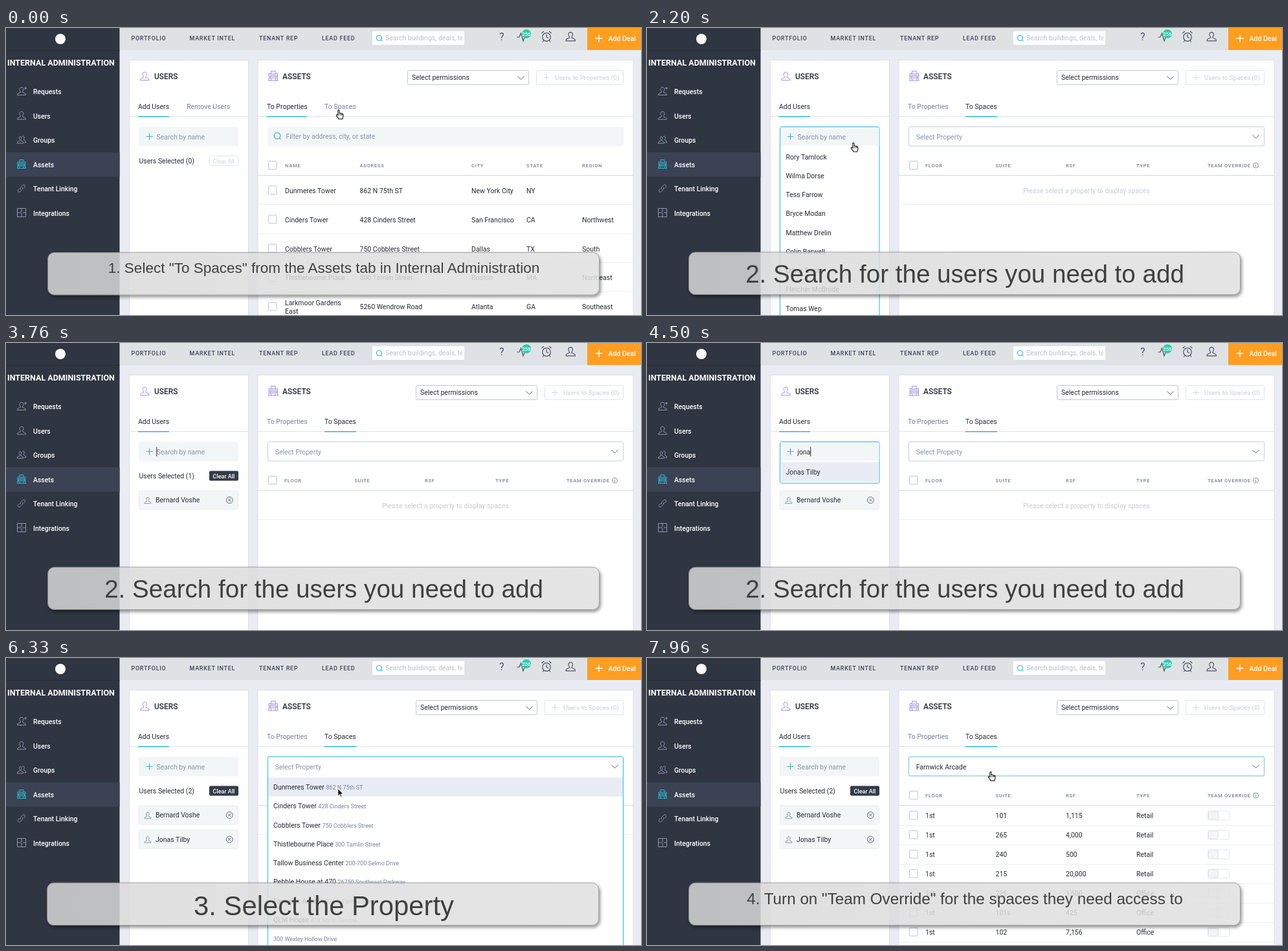
Animation, 981 px wide and 443 px high, one loop 8 s. Source, as an HTML page:

```html
<!DOCTYPE html>
<html lang="en">
<head>
<meta charset="utf-8">
<title>Assign users to spaces</title>
<style>
html, body { margin: 0; width: 100%; height: 100%; overflow: hidden; background: #e9ecf3; }
svg { display: block; width: 981px; height: 443px; font-family: Roboto, Arial, sans-serif; }
text { white-space: pre; }
</style>
</head>
<body>
<svg viewBox="0 0 981 443">
  <defs>
    <linearGradient id="glass"><stop stop-color="#dadada"/><stop offset="1" stop-color="#e1e1e1"/></linearGradient>
    <filter id="shadow" x="-5%" y="-30%" width="110%" height="170%">
      <feDropShadow dx="2" dy="3" stdDeviation="2.5" flood-opacity=".5"/>
    </filter>
    <clipPath id="searchClip"><rect x="566" y="5" width="139" height="21"/></clipPath>
    <clipPath id="listClip"><rect x="405" y="183" width="548" height="260"/></clipPath>
  </defs>
  <g id="base"></g>
  <g id="live"></g>
</svg>
<script>
const INK = '#262b36', MUTED = '#7482a3', HINT = '#8794ae', BLUE = '#2eb8d6', PALE = '#f2f6f6', FAINT = '#c6ccd8';
const LOOP = 8000, ROW = 29.25;

const PERSON = 'M7 1C5 1 4 2.4 4 4.2 4 5.7 4.7 6.8 5.4 7.4V8.8L1.5 10.5C.8 11 .5 12 .5 13H13.5C13.5 12 13.2 11 12.5 10.5L8.6 8.8V7.4C9.3 6.8 10 5.7 10 4.2 10 2.4 9 1 7 1Z';
const BUILDING = 'M1 13.5V4H4M4 13.5V.5H10V13.5M10 4H13V13.5M0 13.5H14M6 3V11M8 3V11M2.5 6V11M11.5 6V11';
const LINK = 'M6 8.5C5 7.5 5 6 6 5L9 2C11 0 14 3 12 5L10 7M8 5.5C9 6.5 9 8 8 9L5 12C3 14 0 11 2 9L4 7';
const GRID = 'M.5.5H13.5V13.5H.5ZM7 .5V5L5.5 6.5 7 8V13.5M.5 7H5M9 7H13.5';
const PAIR = 'M5 2C3 2 3 6 4.3 7V8.4L.5 10.5V12.5H9.5V10.5L6 8.4V7C7.2 6 7 2 5 2ZM8 3C9-.3 12 1.5 11 5L10.3 7.3 13.6 9.5V11.5H11';
const HAND = 'M-1.2 8V1.3C-1.2-.2 1-.2 1 1.3V5.5C1.2 4.6 3 4.6 3 5.8 3.3 5 5 5.2 5 6.4 5.4 5.8 6.8 6 6.8 7.2V10C6.8 11.5 5.8 12 5.8 14H0C0 12.5-2.5 10.5-3.6 8.6-4.2 7.4-2.6 6.6-1.2 8Z';
const ARROW = 'M0 0V11.5L2.6 9 4.4 13 6.2 12.2 4.5 8.4H8Z';

const clamp = v => Math.max(0, Math.min(1, v));
const ramp = (t, from, to) => clamp((t - from) / (to - from));
const smooth = p => p * p * (3 - 2 * p);

// y is the middle of the capital letters
function text(x, y, str, { size = 10.5, fill = INK, weight = 400, gap = 0, more = '' } = {}) {
  return `<text x="${x}" y="${(y + size * .355).toFixed(2)}" font-size="${size}" fill="${fill}" font-weight="${weight}" letter-spacing="${gap}" ${more}>${str}</text>`;
}
const rect = (x, y, w, h, fill = 'none', stroke = 'none', r = 0) =>
  `<rect x="${x}" y="${y}" width="${w}" height="${h}" rx="${r}" fill="${fill}" stroke="${stroke}"/>`;
const path = (d, stroke, width = 1, fill = 'none', at = '') =>
  `<path d="${d}" stroke="${stroke}" stroke-width="${width}" fill="${fill}" ${at && `transform="${at}"`}/>`;
const icon = (d, x, y, color, scale = 1, width = 1) =>
  path(d, color, width / scale, 'none', `translate(${x} ${y}) scale(${scale})`);
const hline = (x1, x2, y, color) => path(`M${x1} ${y}H${x2}`, color);
const plus = (x, y, r, color, width = 1.2) => path(`M${x - r} ${y}H${x + r}M${x} ${y - r}V${y + r}`, color, width);
const chevron = (x, y) => path(`M${x - 5} ${y - 2.5}L${x} ${y + 2.5} ${x + 5} ${y - 2.5}`, '#566078');
const lens = (x, y, r) => `<circle cx="${x}" cy="${y}" r="${r}" fill="none" stroke="${BLUE}" stroke-width="1.2"/>` +
  path(`M${x + r * .7} ${y + r * .7}l2 2`, BLUE, 1.2);
const fade = (alpha, body) => alpha <= 0 ? '' : `<g opacity="${alpha.toFixed(3)}">${body}</g>`;
const heading = (x, y, s) => text(x, y, s, { size: 7.5, weight: 500, gap: .75, fill: '#75809a' });
const checkbox = y => rect(405.5, y - 6.5, 12.5, 12.5, '#fff', '#bcc4d1', 1);
const tab = (x, s, fill = INK) => text(x, 121.5, s, { fill });
const underline = (x, w) => rect(x, 136, w, 1.5, BLUE);

const pen = document.createElement('canvas').getContext('2d');
pen.font = '10.5px Roboto, Arial, sans-serif';

const people = ['Rory Tamlock', 'Wilma Dorse', 'Tess Farrow', 'Bryce Modan', 'Matthew Drelin', 'Colin Barwell',
  'Omar Tranby', 'Fletcher McBrode', 'Tomas Wep'];
const first = 'Bernard Voshe', second = 'Jonas Tilby';

const buildings = [
  ['Dunmeres Tower', '862 N 75th ST', 'New York City', 'NY', ''],
  ['Cinders Tower', '428 Cinders Street', 'San Francisco', 'CA', 'Northwest'],
  ['Cobblers Tower', '750 Cobblers Street', 'Dallas', 'TX', 'South'],
  ['Thistlebourne Place', '300 Tamlin Street', 'Boston', 'MA', 'Northeast'],
  ['Larkmoor Gardens', '5260 Wendrow Road', 'Atlanta', 'GA', 'Southeast']];

const properties = [
  ['Dunmeres Tower', '862 N 75th ST'], ['Cinders Tower', '428 Cinders Street'],
  ['Cobblers Tower', '750 Cobblers Street'], ['Thistlebourne Place', '300 Tamlin Street'],
  ['Tallow Business Center', '200-700 Selmo Drive'], ['Pebble House at 470', '26750 Southeast Parkway'],
  ['Farnwick Arcade', '274 N Farnwick Ave'], ['QLM House', '418 North Tamble'],
  ['', '300 Wexley Hollow Drive'], ['OBN Labs Headquarters', '2040 Q Avenue SE'],
  ['835 North Callowen Street', '835 North Callowen Street'], ['Kilnbank Court IV', '760 Corbel Street'],
  ['Three Pelworth Campus Drive', 'Two Pelworth Campus Drive'], ['Larkmoor Gardens East', '5260 Wendrow Road']];

const spaces = [['101', '1,115', 'Retail'], ['265', '4,000', 'Retail'], ['240', '500', 'Retail'], ['215', '20,000', 'Retail'],
  ['225', '1,500', 'Office'], ['101s', '425', 'Office'], ['102', '7,156', 'Office']];

const captions = [
  { from: 0, x: 64, y: 346, size: 22.5, mid: 370.5, words: '1. Select "To Spaces" from the Assets tab in Internal Administration' },
  { from: 1060, x: 64, y: 345.5, size: 38.6, mid: 379, words: '2. Search for the users you need to add' },
  { from: 4700, x: 63, y: 346.5, size: 41.8, mid: 382, words: '3. Select the Property' },
  { from: 7130, x: 64, y: 346.5, size: 24.25, mid: 371, words: '4. Turn on "Team Override" for the spaces they need access to' }];

function sidebar() {
  const entries = [['Requests', PERSON], ['Users', PERSON], ['Groups', PAIR], ['Assets', BUILDING], ['Tenant Linking', LINK], ['Integrations', GRID]];
  return rect(0, 0, 175.5, 443, '#2f3541') + hline(0, 175.5, 34.5, '#282d38') + rect(0, 192, 175.5, 37.5, '#3b4253') +
    '<circle cx="84" cy="17" r="8" fill="#fff"/>' +
    text(2, 53.5, 'INTERNAL ADMINISTRATION', { size: 12.5, weight: 700, fill: '#fff' }) +
    entries.map(([name, d], i) => {
      const y = 98.5 + i * 37.5;
      return icon(d, 17, y - 8, name === 'Assets' ? BLUE : '#8c97af') + text(42, y, name, { weight: 500, size: 10.4, fill: '#fff' });
    }).join('') + plus(30, 93, 2, '#8c97af', 1);
}

function topBar() {
  const color = '#4a5368';
  return rect(175.5, 0, 805.5, 34, '#dfe2e4') +
    [[193.5, 'PORTFOLIO'], [283.5, 'MARKET INTEL'], [391, 'TENANT REP'], [488, 'LEAD FEED']]
      .map(([x, s]) => text(x, 15.5, s, { size: 9, weight: 500, gap: .7, fill: '#3b4357' })).join('') +
    rect(566, 5, 142, 21, '#fff', 'none', 1) + lens(576.5, 15.5, 4) +
    `<g clip-path="url(#searchClip)">${text(586, 15.5, 'Search buildings, deals, tenants', { fill: '#b9c1ce' })}</g>` +
    text(762, 13, '?', { size: 16, fill: color }) +
    path('M789.5 14H793L795.5 8 799 20 801.5 13H806', color, 1.2) +
    '<circle cx="804" cy="9" r="7" fill="#2acfab"/>' +
    text(804, 9, '256', { size: 7.5, weight: 500, fill: '#fff', more: 'text-anchor="middle"' }) +
    `<circle cx="835" cy="14" r="6.3" fill="none" stroke="${color}" stroke-width="1.2"/>` +
    path('M835 10V14L838 15.5M827.5 8L831 5M842.5 8L839 5M831 19L829 21.5M839 19L841 21.5', color, 1.2) +
    icon(PERSON, 864.5, 5.5, color, 1.1, 1.2) +
    rect(898, 0, 83, 34, '#ff9e20') + plus(916, 16, 5.5, '#fff', 1.5) +
    text(930.5, 16, 'Add Deal', { weight: 500, fill: '#fff' });
}

function cards() {
  return [[190.5, 184], [389, 580]].map(([x, w]) =>
      rect(x, 49.5, w, 400, '#fff', '#dde0e7') + hline(x, x + w, 136.5, '#dfe2e8')).join('') +
    icon(PERSON, 207, 67, '#a28fdf', 1.05) + text(229, 74.5, 'USERS', { size: 12, weight: 500 }) +
    icon(BUILDING, 405, 66, '#a28fdf', 1.12) + text(427, 74.5, 'ASSETS', { size: 12, weight: 500 }) +
    tab(204, 'Add Users') + underline(204, 48);
}

function permissionBar(x, label) {
  return rect(x + .5, 65.5, 187, 22, '#fff', '#c0c7d2', 2) + text(x + 7, 76.5, 'Select permissions') + chevron(x + 175.5, 77) +
    rect(x + 199.5, 65.5, 754 - x, 22, '#fff', '#dfe3e9', 2) +
    plus(x + 215, 76.5, 5, '#d3d8e1', 1) + text(x + 228, 76.5, label, { size: 9.9, fill: FAINT });
}

function propertiesView() {
  const columns = [431, 546.5, 719, 804, 890];
  return permissionBar(620, 'Users to Properties (0)') + tab(279, 'Remove Users', MUTED) +
    tab(403, 'To Properties') + tab(492, 'To Spaces', MUTED) + underline(403, 62) +
    rect(404, 152.5, 550, 30, PALE, 'none', 2) + lens(419, 166.5, 4.8) +
    text(432.5, 167.5, 'Filter by address, city, or state', { fill: HINT }) +
    checkbox(212) + ['NAME', 'ADDRESS', 'CITY', 'STATE', 'REGION'].map((s, i) => heading(columns[i], 212, s)).join('') +
    hline(389, 969, 227.5, '#d3d8e0') +
    buildings.map((row, i) => {
      const y = 251 + i * 44.9, last = i === 4;
      return checkbox(y - .5) + row.map((s, c) => text(columns[c], last && !c ? y - 6.5 : y, s)).join('') +
        (last ? text(431, y + 7, 'East') : hline(389, 969, 272.5 + i * 44.9, '#eceef2'));
    }).join('');
}

function spacesView(t, cursor) {
  const chosen = t >= 7130, loaded = t >= 7230, open = t >= 6200 && !chosen;
  const columns = [430, 538.5, 647, 756, 866];
  const hover = chosen ? ramp(t, 7860, 8060) : ramp(t, 5480, 5560);
  let out = permissionBar(633, 'Users to Spaces (0)') +
    tab(403, 'To Properties', MUTED) + tab(492, 'To Spaces') + underline(492, 49) +
    checkbox(212) + ['FLOOR', 'SUITE', 'RSF', 'TYPE', 'TEAM OVERRIDE'].map((s, i) => heading(columns[i], 212, s)).join('') +
    '<circle cx="940.5" cy="212" r="4" fill="none" stroke="#75809a" stroke-width=".9"/>' + path('M940.5 211.5V214.3M940.5 209.5V210.5', '#75809a') +
    hline(389, 969, 227.5, '#d3d8e0');
  if (loaded) {
    out += spaces.map((row, i) => {
      const y = 243 + i * 30;
      return checkbox(y) + ['1st', ...row].map((s, c) => text(columns[c], y + .5, s)).join('') +
        rect(866.5, y - 7, 33, 14, '#fff', '#e4e6ea', 2) + rect(867.5, y - 6, 15, 12, '#f3f5f6', '#dfe2e7', 2) +
        hline(389, 969, y + 15.5, '#eceef2');
    }).join('');
  } else if (!chosen) {
    out += text(581, 251, 'Please select a property to display spaces', { fill: FAINT }) + hline(389, 969, 272.5, '#eceef2');
  }
  if (open) out += propertyList(t, cursor);
  else out += rect(404.5, 152.5, 549, 29.5, '#fff', '#c8ceda', 2) + fade(hover, rect(404.5, 152.5, 549, 29.5, 'none', BLUE, 2));
  return out + text(415.7, 168, chosen ? 'Farnwick Arcade' : 'Select Property', { fill: chosen ? INK : HINT }) + chevron(940.5, 167.5);
}

function propertyList(t, cursor) {
  const scroll = 124.5 * smooth(ramp(t, 6460, 7000));
  const rows = properties.map(([name, address], i) => {
    const y = 199 + i * ROW - scroll;
    const lit = cursor.y > 183 && Math.abs(cursor.y - y) < ROW / 2;
    const tail = `<tspan dx="${name ? 2.5 : 0}" font-size="9" fill="${MUTED}">${address}</tspan>`;
    return (lit ? rect(405, y - 14.5, 548, ROW, '#e9ecf4') : '') + text(413, y + .5, name + tail);
  }).join('');
  return rect(404.5, 152.5, 549, 300, '#fff', BLUE, 2) + `<g clip-path="url(#listClip)">${rows}</g>`;
}

const typed = (t, word, start, step) => word.slice(0, Math.floor((t - start) / step) + 1);

function usersPanel(t) {
  const query = t < 2430 || (t >= 3460 && t < 4030) || t >= 4700 ? '' :
    t < 3460 ? typed(t, 'bernard', 2430, 130) : typed(t, 'jona', 4030, 150);
  const picked = t < 3460 ? 0 : t < 4700 ? 1 : 2;
  const open = query || (t >= 1700 && t < 2430);
  const caret = query || (t >= 1700 && t < 2200) || (t >= 3460 && t < 4860) || (t >= 5330 && t < 5830);
  const ready = ramp(t, 3460, 3760);
  let out = rect(205, 152.5, 154, 30, PALE, 'none', 2) +
    text(205.5, 205.3, `Users Selected (${picked})`) +
    rect(314.5, 197.5, 44, 15, '#fff', '#e2e5ea', 2) + text(319.5, 205.3, 'Clear All', { size: 9, fill: '#d0d5dd' }) +
    fade(ready, rect(314, 197.5, 45, 15, '#343a48', 'none', 2) + text(319.5, 205.3, 'Clear All', { size: 9, weight: 500, fill: '#fff' }));
  [first, second].slice(0, picked).forEach((name, i) => {
    const y = 242.5 + i * 37.5;
    out += fade(i ? 1 : .3 + .7 * ready, rect(205.5, y - 14.5, 153, 29, '#f3f6f6', '#e9edee', 2) + icon(PERSON, 213.5, y - 5, HINT, .78) +
      text(231, y, name) + `<circle cx="345.3" cy="${y}" r="5" fill="none" stroke="#5d6880"/>` +
      path(`M343.3 ${y - 2}l4 4m0-4l-4 4`, '#5d6880'));
  });
  if (open) {
    const match = t < 3460 ? first : second;
    const names = query ? [match, ...people].slice(0, [9, 5, 2, 1][Math.min(query.length, 4) - 1]) : people;
    out += rect(205.5, 152.5, 153.5, 34.5 + names.length * ROW, '#fff', BLUE, 2) + rect(206, 153, 152.5, 28.5, PALE) +
      (query ? rect(207, 184, 150.5, 30, '#e9ecf4') : '') +
      names.map((name, i) => text(214.5, 199 + i * ROW, name)).join('');
  }
  const caretX = 232.8 + pen.measureText(query).width;
  return out + plus(221.5, 167.5, 5, BLUE) + text(232.5, 168, query || 'Search by name', { fill: query ? INK : HINT }) +
    (caret ? path(`M${caretX} 160.5V175`, INK) : '');
}

const route = [[0, 514, 126.5], [1030, 514, 126.5], [1430, 319, 177], [5330, 319, 177], [5660, 543, 157], [6130, 520, 160],
  [6200, 520, 160], [6480, 504, 252], [7400, 504, 252], [7960, 531, 175.5], [LOOP, 531, 175.5]];

function cursorAt(t) {
  const i = route.findIndex((stop, n) => n && t < stop[0]);
  const [t0, x0, y0] = route[i - 1], [t1, x1, y1] = route[i];
  const p = smooth(ramp(t, t0, t1));
  return { x: x0 + (x1 - x0) * p, y: y0 + (y1 - y0) * p, shown: t < 2430 || t >= 5330 };
}

function pointer({ x, y, shown }) {
  if (!shown) return '';
  const overTab = x > 492 && y < 137;
  const overField = y > 152 && y < 183 && (x < 360 || x > 404);
  const at = `translate(${x.toFixed(1)} ${y.toFixed(1)})`;
  return overTab || overField ? path(HAND, '#111', 1.1, '#fff', at) + path('M1 6V8.5M3 6.5V8.5M5 7V8.5', '#111', .8, 'none', at)
    : path(ARROW, '#fff', 1, '#000', at);
}

function caption(t) {
  return captions.map((c, i) => {
    const next = captions[i + 1];
    const alpha = (i ? ramp(t, c.from, c.from + 160) : 1) * (next ? 1 - ramp(t, next.from, next.from + 160) : 1);
    return fade(alpha, `<g opacity=".84" filter="url(#shadow)">${rect(c.x + .5, c.y + .5, 852, 65.5, 'url(#glass)', '#8e8e8e', 10)}</g>` +
      text(491, c.mid, c.words, { size: c.size, fill: '#404040', more: 'text-anchor="middle" font-family="Liberation Sans, Arial, sans-serif"' }));
  }).join('');
}

function scene(t) {
  const swap = t < 160 ? 0 : ramp(t, 130, 260);
  const cursor = cursorAt(t);
  return fade(1 - swap, propertiesView()) + fade(swap, spacesView(t, cursor)) + usersPanel(t) + caption(t) + pointer(cursor);
}

const live = document.getElementById('live');
document.getElementById('base').innerHTML = cards() + topBar() + sidebar();
let shown = '';
const start = performance.now();

function frame(now) {
  const markup = scene(Math.max(0, now - start) % LOOP);
  if (markup !== shown) live.innerHTML = shown = markup;
  requestAnimationFrame(frame);
}
frame(start);
</script>
</body>
</html>
```
